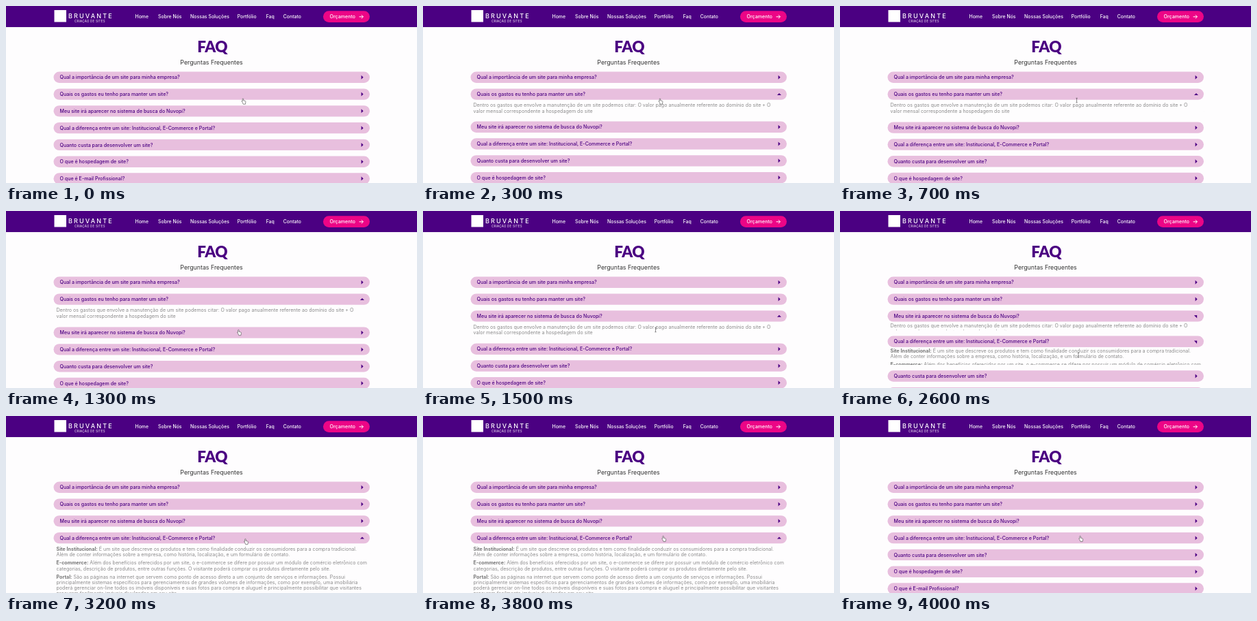
An HTML page for the animation above (4.1 s loop, 600x260 px).

```html
<!DOCTYPE html>
<html lang="pt-BR">
<head>
<meta charset="utf-8">
<title>Perguntas Frequentes</title>
<style>
  html, body { margin: 0; width: 100%; height: 100%; overflow: hidden; background: #fefdfe; }
  #stage { display: block; width: 600px; height: 260px; }
  text { font-family: Inter, "Open Sans", sans-serif; font-size: 7.1px; white-space: pre; }
  .nav text { fill: #fff; font-size: 6.95px; font-weight: 500; }
  .nav .brand { font-size: 9px; letter-spacing: 2.15px; }
  .nav .tagline { font-size: 4.4px; letter-spacing: .3px; font-weight: 400; }
  .nav .cta { font-size: 7.1px; }
  .title { font: 900 22.5px Lato, sans-serif; letter-spacing: -.4px; fill: #4b0082; text-anchor: middle; }
  .subtitle { font-size: 8.8px; fill: #333; text-anchor: middle; }
  .pill { fill: #e8bfde; }
  .question { font-weight: 500; fill: #4b0082; }
  .caret { fill: #4b0082; }
  .answer text { fill: #8a8a8a; }
  .answer .lead { font-weight: 700; fill: #777; }
  .cursor { fill: #fff; stroke: #444; stroke-width: .6; stroke-linejoin: round; }
</style>
</head>
<body>
<svg id="stage" viewBox="0 0 600 260" xmlns="http://www.w3.org/2000/svg">
  <rect width="600" height="260" fill="#fefdfe"/>
  <g class="nav">
    <rect width="600" height="31" fill="#4b0082"/>
    <rect x="70.5" y="6" width="17.5" height="17.5" fill="#fff"/>
    <text class="brand" x="91" y="17.6">BRUVANTE</text>
    <text class="tagline" x="100" y="23.6">CRIAÇÃO DE SITES</text>
    <text x="188.5" y="18">Home</text>
    <text x="222" y="18">Sobre Nós</text>
    <text x="269" y="18">Nossas Soluções</text>
    <text x="337.7" y="18">Portfólio</text>
    <text x="379.7" y="18">Faq</text>
    <text x="404.7" y="18">Contato</text>
    <rect x="463" y="7.3" width="68" height="16.6" rx="8.3" fill="#ec0586"/>
    <text class="cta" x="472.5" y="18.1">Orçamento</text>
    <path d="M515.6 15.8H521.4M518.9 13.2L521.5 15.8L518.9 18.4" fill="none" stroke="#fff"/>
  </g>
  <text class="title" x="301.3" y="68.3">FAQ</text>
  <text class="subtitle" x="300" y="86.2">Perguntas Frequentes</text>
  <g id="list"></g>
  <path id="cursor" class="cursor"/>
</svg>
<script>
const LOOP = 4100, STEP = 100, SLIDE = 205, LAG = 23;
const LEFT = 69.5, WIDTH = 461.5, TOP = 96.6, PILL = 16.4, PITCH = 24.78, PAD = 3.8;

const costs = [[
  'Dentro os gastos que envolve a manutenção de um site podemos citar: O valor pago anualmente referente ao domínio do site + O',
  'valor mensal correspondente a hospedagem do site'
]];
const kinds = [[
  '*Site Institucional:* É um site que descreve os produtos e tem como finalidade conduzir os consumidores para a compra tradicional.',
  'Além de conter informações sobre a empresa, como história, localização, e um formulário de contato.'
], [
  '*E-commerce:* Além dos benefícios oferecidos por um site, o e-commerce se difere por possuir um módulo de comércio eletrônico com',
  'categorias, descrição de produtos, entre outras funções. O visitante poderá comprar os produtos diretamente pelo site.'
], [
  '*Portal:* São as páginas na internet que servem como ponto de acesso direto a um conjunto de serviços e informações. Possui',
  'principalmente sistemas específicos para gerenciamentos de grandes volumes de informações, como por exemplo, uma imobiliária',
  'poderá gerenciar on-line todos os imóveis disponíveis e suas fotos para compra e aluguel e principalmente possibilitar que visitantes',
  'procurem facilmente imóveis divulgados em seu site.'
]];

const items = [
  { q: 'Qual a importância de um site para minha empresa?' },
  { q: 'Quais os gastos eu tenho para manter um site?', body: costs, full: 24.3, open: 97, close: 1295 },
  { q: 'Meu site irá aparecer no sistema de busca do Nuvopi?', body: costs, full: 24.3, open: 1295, close: 2500 },
  { q: 'Qual a diferença entre um site: Institucional, E-Commerce e Portal?', body: kinds, full: 84, open: 2500, close: 3795 },
  { q: 'Quanto custa para desenvolver um site?' },
  { q: 'O que é hospedagem de site?' },
  { q: 'O que é E-mail Profissional?' }
];

// time, x, y of the pointer's hot spot
const track = [
  [0, 346, 136], [600, 346, 136], [1200, 339.5, 174.5], [1700, 339.5, 174.5],
  [2000, 348, 207.5], [2300, 348, 210.5], [2600, 348, 211.8],
  [3100, 349.5, 181.5], [3200, 349.5, 180.5], [3600, 350.7, 176.3]
];

const shapes = {
  hand: 'M-.8 5.4L-2 4Q-1.9 3-.8 3.8V.4Q0-.6 .7 .4V2.9L3.3 3.5Q4 3.9 3.9 5L3.4 8.2H.3Z',
  beam: 'M-1.2-3.2H1.2M0-3.2V3.2M-1.2 3.2H1.2',
  arrow: 'M0 0V7L1.6 5.5L2.7 8L3.7 7.5L2.6 5.1H4.8Z'
};

const cursor = document.getElementById('cursor');
const list = document.getElementById('list');

function add(parent, tag, attrs, content) {
  const el = document.createElementNS('http://www.w3.org/2000/svg', tag);
  for (const key in attrs) el.setAttribute(key, attrs[key]);
  if (content) el.textContent = content;
  return parent.appendChild(el);
}

function addLine(parent, line, y) {
  const text = add(parent, 'text', { x: 73.5 - LEFT, y });
  line.split('*').forEach((part, i) => {
    if (part) add(text, 'tspan', i % 2 ? { class: 'lead' } : {}, part);
  });
}

for (const item of items) {
  item.row = add(list, 'g');
  add(item.row, 'rect', { class: 'pill', x: LEFT, width: WIDTH, height: PILL, rx: PILL / 2 });
  add(item.row, 'text', { class: 'question', x: 78.5, y: 10.8 }, item.q);
  item.caret = add(item.row, 'path', { class: 'caret', d: 'M-1.4-3L1.7 0L-1.4 3Z' });
  if (!item.body) continue;
  item.panel = add(item.row, 'svg', { class: 'answer', x: LEFT, y: PILL, width: WIDTH, height: 0, overflow: 'hidden' });
  item.copy = add(item.panel, 'g');
  let y = 6.9;
  for (const para of item.body) {
    for (const line of para) {
      addLine(item.copy, line, y);
      y += 8.2;
    }
    y += 4;
  }
}

const clamp = p => Math.min(1, Math.max(0, p));
const swing = p => .5 - Math.cos(Math.PI * clamp(p)) / 2;

function pointer(t) {
  const next = track.findIndex(k => k[0] > t);
  if (next < 0) return track[track.length - 1].slice(1);
  const a = track[next - 1], b = track[next];
  const p = swing((t - a[0]) / (b[0] - a[0]));
  return [a[1] + (b[1] - a[1]) * p, a[2] + (b[2] - a[2]) * p];
}

function draw(t) {
  const [px, py] = pointer(t);
  let y = TOP, kind = 'arrow';
  for (const item of items) {
    let height = 0, turn = 0;
    if (item.panel) {
      const shut = swing((t - item.close) / SLIDE);
      const shown = swing((t - item.open - LAG) / SLIDE) - shut;
      turn = swing((t - item.open) / SLIDE) - shut;
      height = Math.max(0, item.full * shown);
      item.panel.setAttribute('height', height);
      item.copy.setAttribute('transform', `translate(0 ${PAD * shown})`);
    }
    item.row.setAttribute('transform', `translate(0 ${y})`);
    item.caret.setAttribute('transform', `translate(520 ${PILL / 2}) rotate(${-90 * turn})`);
    if (py >= y && py < y + PILL) kind = 'hand';
    else if (py >= y + PILL && py < y + PILL + height) kind = 'beam';
    y += PITCH + height;
  }
  cursor.setAttribute('d', shapes[kind]);
  cursor.setAttribute('transform', `translate(${px} ${py})`);
}

const start = performance.now();
function tick() {
  const t = (performance.now() - start) % LOOP;
  draw(Math.floor(t / STEP) * STEP);
  requestAnimationFrame(tick);
}
tick();
</script>
</body>
</html>
```
